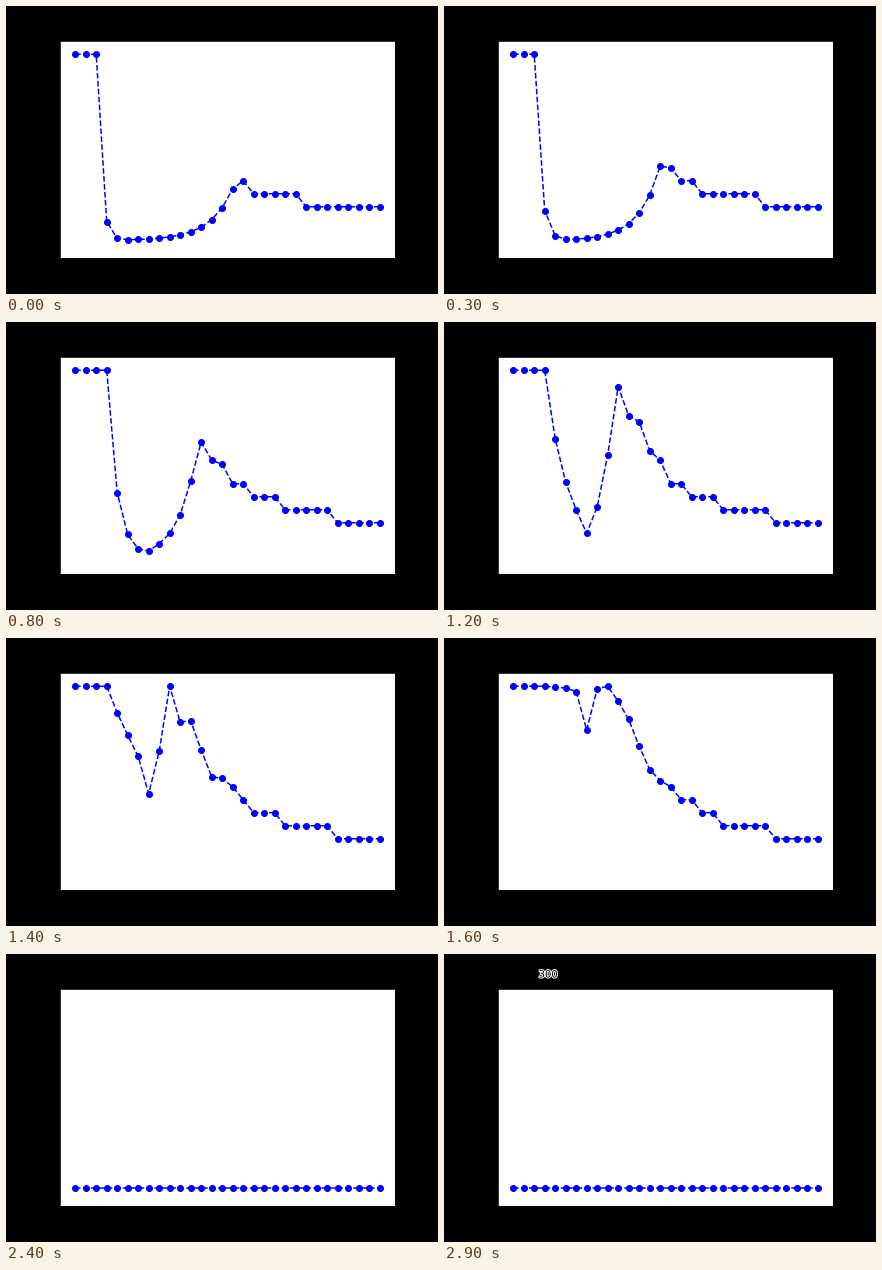
These frames come from a looping animation (432 by 288 pixels, 3000 ms). A matplotlib script:

```python
import numpy as np
import matplotlib.pyplot as plt
from matplotlib import patheffects
from matplotlib.animation import FuncAnimation

W, H, DPI = 432, 288, 72
FRAMES, INTERVAL = 30, 100
COUNT = 30
FLAT, STEP = 0.18, 0.07  # tail level and height of its stairs
DROP = 24                # the curve collapses to zero here

x = np.arange(COUNT)


def right_slope(i):
    """Decay from 1 down uneven stairs to the flat tail."""
    rng = np.random.default_rng(i)
    start = 9.6 - 3 * np.exp(-i / 4)
    k = x + 0.3 * rng.standard_normal(COUNT)
    y = FLAT + (1 - FLAT) * np.exp(-(k - start) / 4.8)
    stairs = FLAT + STEP * np.round((y - FLAT) / STEP)
    return np.where(y < 0.45, stairs, y)


def left_slope(i):
    """Plateau at 1, then a fall that flattens with time."""
    edge = 2 if i < 7 else 3
    rate = max(2.3 * (1 - i / 15), 0.005)
    return np.exp(-rate * np.maximum(x - edge, 0))


def rise(i):
    """Climb out of the well; it moves left and steepens."""
    center = 14.3 - 0.56 * i
    width = 2.2 - 0.065 * i
    return 0.2 * np.exp((x - center) / width)


def heights(i):
    if i >= DROP:
        return np.zeros(COUNT)
    well = np.clip(np.maximum(left_slope(i), rise(i)), 0, 1)
    depth = 0.22 * min(1, np.exp((16 - i) / 2))
    notch = 1 - depth * np.exp(-((x - 7) / 0.6) ** 2)
    return np.minimum(well * notch, right_slope(i))


fig = plt.figure(figsize=(W / DPI, H / DPI), dpi=DPI, facecolor="black")
ax = fig.add_axes([0.125, 0.125, 0.775, 0.755])
margin = 0.05 * (COUNT - 1)
ax.set(xticks=[], yticks=[], xlim=(-margin, COUNT - 1 + margin),
       ylim=(-0.0955, 1.0735))
line, = ax.plot(x, heights(0), "--o", color="#0000ff", lw=1.5, ms=6)

# Black digits on black: only their bright rim can be seen.
label = fig.text(94.6 / W, 1 - 23.5 / H, "", color="black", fontsize=10,
                 family="DejaVu Sans")
label.set_path_effects([patheffects.Stroke(linewidth=2, foreground="white"),
                        patheffects.Normal()])


def update(i):
    line.set_ydata(heights(i))
    label.set_text(str(10 * (i + 1)) if i > DROP else "")
    return line, label


anim = FuncAnimation(fig, update, frames=FRAMES, interval=INTERVAL,
                     repeat=True, repeat_delay=0)
plt.show()
```
